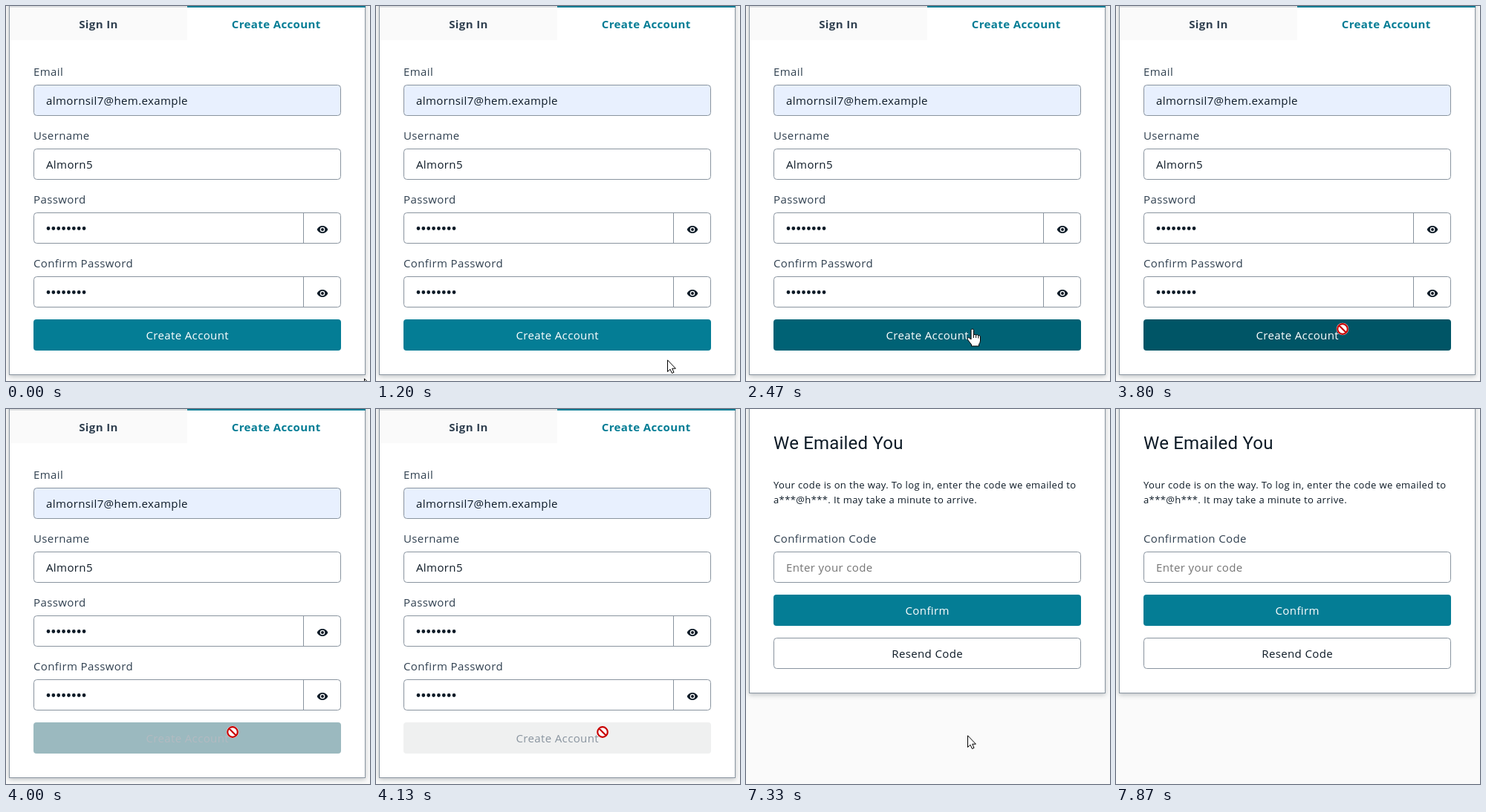
Write an HTML page that moves like this. It is 490 px wide and 505 px high and loops after 8.99 s.

```html
<!DOCTYPE html>
<html lang="en">
<head>
<meta charset="utf-8">
<title>Create account</title>
<style>
html, body { margin: 0; width: 100%; height: 100%; overflow: hidden; background: #fafafa; }
svg { display: block; }
text { font: 15px "Open Sans", "Noto Sans", sans-serif; letter-spacing: .38px; fill: #0d1a26; }
.label { fill: #304050; }
.mid { text-anchor: middle; }
.tab { font-weight: 700; text-anchor: middle; }
.white { fill: #fff; }
.small { font-size: 13px; }
.title { font: 24px Roboto, sans-serif; letter-spacing: .2px; }
.box, .card { fill: #fff; stroke: #89949f; }
.card { filter: drop-shadow(0 2px 3px rgba(13, 26, 38, .25)); }
.teal { fill: #047d95; }
.arrow, .hand { fill: #fff; stroke: #000; stroke-linejoin: round; }
</style>
</head>
<body>
<svg width="490" height="505" viewBox="0 0 490 505">
  <defs>
    <g id="secret">
      <rect class="box" x="37.5" y=".5" width="413" height="41" rx="4"/>
      <path d="M400.5 1V41" stroke="#89949f"/>
      <path d="M57 21.5h49" stroke="#0d1a26" stroke-width="4.8" stroke-linecap="round" stroke-dasharray="0 6.86"/>
      <g transform="translate(418 15) scale(.667)" fill="#0d1a26">
        <path d="M12 4.5C7 4.5 2.7 7.6 1 12c1.7 4.4 6 7.5 11 7.5s9.3-3.1 11-7.5c-1.7-4.4-6-7.5-11-7.5z"/>
        <circle cx="12" cy="12" r="5" fill="#fff"/>
        <circle cx="12" cy="12" r="3"/>
      </g>
    </g>
  </defs>

  <g id="signup">
    <rect class="card" x="4.5" y="-9.5" width="479" height="506"/>
    <path d="M5 0H244V46H5z" fill="#fafafa"/>
    <path d="M5 0H244V2H5z" fill="#dcdee0"/>
    <path class="teal" d="M244 0H484V2H244z"/>
    <text class="tab label" x="124.5" y="30">Sign In</text>
    <text class="tab teal" x="363.7" y="30">Create Account</text>
    <text class="label" x="37" y="94">Email</text>
    <rect class="box" x="37.5" y="106.5" width="413" height="41" rx="4" style="fill:#e8f0fe"/>
    <text x="54" y="133">almornsil7@hem.example</text>
    <text class="label" x="37" y="180">Username</text>
    <rect class="box" x="37.5" y="192.5" width="413" height="41" rx="4"/>
    <text x="54" y="219">Almorn5</text>
    <text class="label" x="37" y="266">Password</text>
    <use href="#secret" y="278"/>
    <text class="label" x="37" y="352">Confirm Password</text>
    <use href="#secret" y="364"/>
    <rect id="button" x="37" y="422" width="414" height="42" rx="4"/>
    <text id="caption" class="mid" x="244.2" y="449">Create Account</text>
  </g>

  <g id="verify">
    <rect class="card" x="4.5" y="-9.5" width="479" height="392"/>
    <text class="title" x="37" y="54">We Emailed You</text>
    <text class="small" x="37" y="107">Your code is on the way. To log in, enter the code we emailed to</text>
    <text class="small" x="37" y="127">a***@h***. It may take a minute to arrive.</text>
    <text class="label" x="37" y="180">Confirmation Code</text>
    <rect class="box" x="37.5" y="192.5" width="413" height="41" rx="4"/>
    <text x="54" y="219" style="fill:#757575">Enter your code</text>
    <rect class="teal" x="37" y="250" width="414" height="42" rx="4"/>
    <text class="mid white" x="244.2" y="277">Confirm</text>
    <rect class="box" x="37.5" y="308.5" width="413" height="41" rx="4"/>
    <text class="mid" x="244.2" y="335">Resend Code</text>
  </g>

  <g id="cursor">
    <path id="arrow" class="arrow" d="M.5 .8V16.5L4 13.2 6.4 18.5 9 17.4 6.7 12.2H11.4z"/>
    <path id="hand" class="hand" d="M-2 13V1.5Q-2 0-.2 0T1.5 1.5V8Q3 6.5 4.6 8 6.5 7 7.8 8.8 10 8 10.5 10V16Q10 19 8.5 20.5V23H-1.5V21L-6.8 14Q-7.5 12-5.5 11.5-4 12-2 14zM1.5 8v4M4.6 8v4M7.8 9v3.5"/>
    <g id="blocked" fill="none">
      <circle r="8.2" fill="#fff"/>
      <path d="M-4.7-4.7 4.7 4.7M6.8 0A6.8 6.8 0 1 1-6.8 0 6.8 6.8 0 1 1 6.8 0" stroke="#c80000" stroke-width="2.2"/>
    </g>
  </g>
</svg>
<script>
const LOOP = 8990, FPS = 15;
const $ = id => document.getElementById(id);
const mix = (a, b, p) => a + (b - a) * p;
const clamp = p => Math.min(1, Math.max(0, p));
const ease = p => p * p * (3 - 2 * p);
const blend = (a, b, p) => `rgb(${a.map((v, i) => Math.round(mix(v, b[i], p)))})`;
const show = (id, on) => $(id).style.display = on ? "" : "none";

const TEAL = [4, 125, 149], HOVER = [0, 98, 117], ACTIVE = [0, 85, 102];
const DISABLED = [239, 240, 240], WHITE = [255, 255, 255], GREY = [137, 148, 159];

// Pointer tracks: [tick, x, y]; the pointer is off stage between them.
const tracks = [
  [[0, 482, 501], [2, 482, 501], [3, 480, 503]],
  [[10, 473, 500], [13, 440, 490], [16, 403, 480], [18, 392, 476], [23, 380, 466],
   [24, 379, 463], [29, 366, 457], [34, 320, 440], [37, 305, 435],
   [109, 305, 435], [111, 290, 442], [114, 200, 468], [117, 83, 500]]
];

function pointer(tick) {
  const track = tracks.find(k => tick >= k[0][0] && tick <= k.at(-1)[0]);
  if (!track) return null;
  const i = Math.max(1, track.findIndex(k => k[0] >= tick));
  const [a, b] = [track[i - 1], track[i]];
  const p = (tick - a[0]) / (b[0] - a[0]);
  return [mix(a[1], b[1], p), mix(a[2], b[2], p)].map(Math.round);
}

function draw(ms) {
  const tick = Math.floor((ms % LOOP + 4) * FPS / 1000);
  const sent = tick >= 67, busy = tick >= 57 && !sent;
  show("signup", !sent);
  show("verify", sent);

  const off = ease(clamp((tick - 57) / 5));
  const fill = busy ? blend(ACTIVE, DISABLED, off)
                    : blend(TEAL, HOVER, ease(clamp((tick - 23) / 4)));
  $("button").style.fill = fill;
  $("caption").style.fill = blend(WHITE, GREY, off);

  const at = pointer(tick);
  show("cursor", at);
  if (at) $("cursor").setAttribute("transform", `translate(${at})`);
  show("hand", tick >= 24 && tick < 57);
  show("blocked", busy);
  show("arrow", tick < 24 || sent);
}

let start;
function loop(now) {
  start ??= now;
  draw(now - start);
  requestAnimationFrame(loop);
}
draw(0);
requestAnimationFrame(loop);
</script>
</body>
</html>
```
